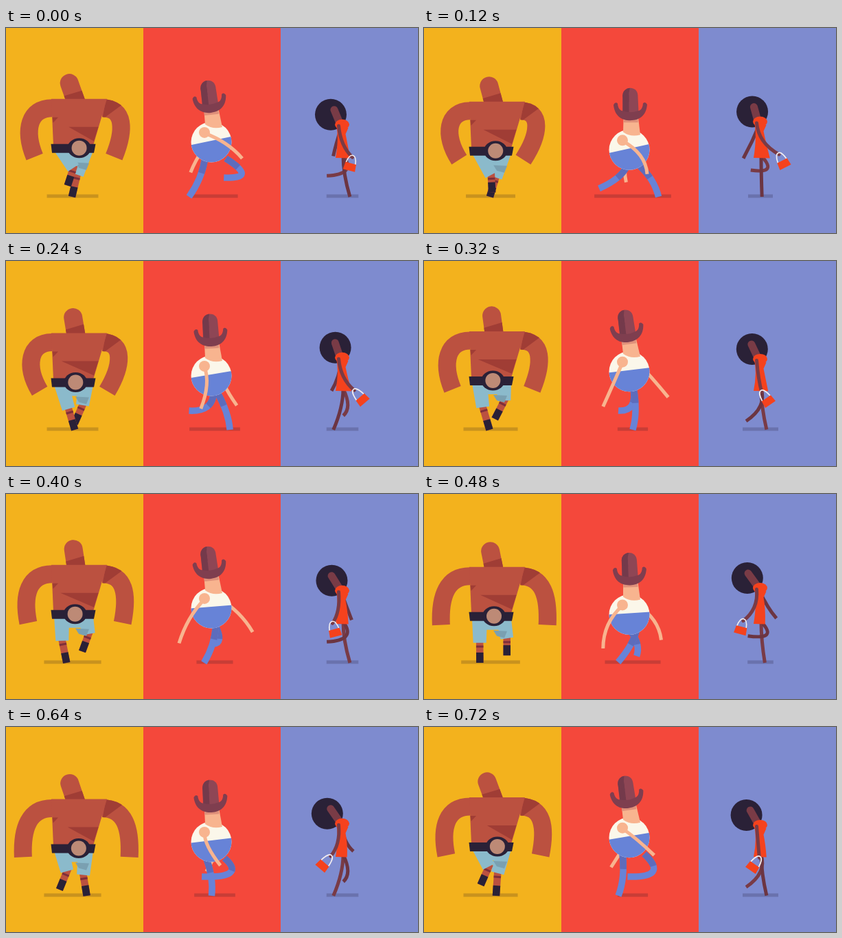
These frames come from a looping animation (600 px wide and 300 px high, 800 ms). An HTML page with a canvas:

```html
<!DOCTYPE html>
<html lang="en">
<head>
<meta charset="utf-8">
<title>Three walkers</title>
<style>
html, body { margin: 0; width: 100%; height: 100%; overflow: hidden; background: #f4483b; }
canvas { display: block; width: 600px; height: 300px; }
</style>
</head>
<body>
<canvas id="stage" width="600" height="300"></canvas>
<script>
const ctx = document.getElementById('stage').getContext('2d');
const LOOP = 800, STEP = 40, LAST = 18, FLOOR = 247;

const C = {
  skin: '#bb5140', skinDark: '#a03d35', navy: '#2a2137', buckle: '#bd8a76',
  shorts: '#8bbacb', shortsDark: '#7aa0b1', stripe: '#7e2f3a',
  peach: '#f8b48f', stubble: '#df907a', shirt: '#fbf7ea', jeans: '#6783d7', jeansDark: '#5d6cbc',
  hat: '#8e4655', hatDark: '#743a4b', brim: '#7f3e4f',
  brown: '#793b46', brownDark: '#6c3542', dress: '#f5421d', strap: '#f3eef0', shade: 'rgba(25,15,35,.2)'
};

// Cosine wave over the loop (u from 0 to 1) with its peak at `peak`; n waves per loop
const wave = (u, peak, n = 1) => Math.cos(2 * Math.PI * n * (u - peak));
const bob = (u, peak) => wave(u, peak, 2);
const clamp = (v, max) => Math.max(0, Math.min(max, v));

function trace(p) {
  ctx.beginPath();
  for (let i = 0; i < p.length; i += 2) ctx.lineTo(p[i], p[i + 1]);
  ctx.closePath();
}
function poly(color, ...p) {
  trace(p);
  ctx.fillStyle = color;
  ctx.fill();
}
function oval(color, x, y, rx, ry = rx) {
  ctx.beginPath();
  ctx.ellipse(x, y, rx, ry, 0, 0, 7);
  ctx.fillStyle = color;
  ctx.fill();
}
// Stroke through 2, 3 or 4 points: line, quadratic or cubic
function limb(color, width, p, cap = 'butt') {
  ctx.beginPath();
  ctx.moveTo(p[0], p[1]);
  const rest = p.slice(2);
  if (rest.length === 2) ctx.lineTo(...rest);
  else if (rest.length === 4) ctx.quadraticCurveTo(...rest);
  else ctx.bezierCurveTo(...rest);
  ctx.strokeStyle = color;
  ctx.lineWidth = width;
  ctx.lineCap = cap;
  ctx.stroke();
}
function clipped(p, draw) {
  ctx.save();
  trace(p);
  ctx.clip();
  draw();
  ctx.restore();
}
function placed(x, y, angle, draw) {
  ctx.save();
  ctx.translate(x, y);
  ctx.rotate(angle);
  draw();
  ctx.restore();
}
function ground(x, half) {
  ctx.fillStyle = C.shade;
  ctx.fillRect(x - half, 243.5, half * 2, 5);
}

function manLeg(hipX, hipY, kneeX, footX, lift) {
  const fy = FLOOR - lift, ky = hipY + 35 - lift * .6;
  const len = Math.hypot(footX - kneeX, fy - ky), ux = (footX - kneeX) / len, uy = (fy - ky) / len;
  const part = (color, a, b) =>
    limb(color, 10.5, [kneeX + ux * a, ky + uy * a, kneeX + ux * b, ky + uy * b]);
  part(C.skin, -4, len);
  part(C.stripe, 4, 7);
  part(C.navy, Math.max(9, len - 15), len);
  const d = Math.hypot(kneeX - hipX, ky - hipY);
  const nx = (ky - hipY) / d * 9.5, ny = (hipX - kneeX) / d * 9.5;
  poly(C.shorts, hipX - 11, hipY, hipX + 11, hipY, kneeX + nx, ky + ny, kneeX - nx, ky - ny);
}

function manArm(u, side, x, top, handX, reach) {
  const swing = wave(u, .2), lean = .29 + .3 * swing;
  const ex = handX - side * reach * swing, ey = top + 85;
  return [x, top + 13.5, x + side * 33, top + 13.5,
    ex + side * Math.sin(lean) * 43, ey - Math.cos(lean) * 43, ex, ey];
}

function drawMan(u) {
  const top = 105.3 + 2.6 * bob(u, .18), hipY = top + 76;
  const headX = 95.2 + 3.4 * wave(u, .42), discX = 103.6 + 3.3 * wave(u, .93);
  const lift = peak => 17 * Math.max(0, wave(u, peak));
  ground(97, 39.5 + 3.5 * wave(u, .65));

  manLeg(116, hipY, 112 + 9 * wave(u, .56), 107 + 14 * wave(u, .66) + 4 * bob(u, .71), lift(.46));
  poly(C.shortsDark, 101, top + 93, 121, top + 94, 117, top + 104, 106, top + 101);
  manLeg(81, hipY, 90 + 9 * wave(u, .07), 89 + 12 * wave(u, .24), lift(.96));
  poly(C.shorts, 70, hipY, 127, hipY, 110, hipY + 16, 88, hipY + 16);

  const head = [headX, top - 23, 102.5, top + 6];
  limb(C.skin, 27, head, 'round');
  clipped([80, top - 3, 130, top - 18, 130, top + 1, 80, top + 1], () => limb(C.skinDark, 27, head, 'round'));

  const right = manArm(u, 1, 140, top, 163.5, 20);
  limb(C.skin, 26, manArm(u, -1, 67, top, 37, 15));
  limb(C.skin, 26, right);
  clipped([147, top - 6, 186, top - 4, 140, top + 30], () => limb(C.skinDark, 26, right));

  poly(C.skin, 66, top, 147, top, 127, top + 68, 69, top + 68);
  poly(C.skinDark, 67.5, top + 27, 76, top + 27, 68.5, top + 35);
  poly(C.skinDark, discX * 2 - 122, top + 41, 134.5, top + 41, 128, top + 62);

  poly(C.navy, 65.5, top + 66, 130.5, top + 66, 128, top + 79, 67, top + 79);
  oval(C.navy, discX, top + 72, 17, 14.5);
  oval(C.buckle, discX, top + 72, 11);
}

function boyLeg(u, peak, hipX, hipY, footX, fold) {
  const lift = clamp(36 * (wave(u, peak) + .15), 28);
  const path = [hipX, hipY, (hipX + footX) / 2 + 7 + fold * lift / 28, 221, footX, FLOOR - lift];
  limb(C.jeans, 9.5, path);
  ctx.setLineDash([22, 999]);
  limb(C.jeansDark, 9.5, path);
  ctx.setLineDash([]);
}

function boyArm(u, side, x, y, handX, handY) {
  limb(C.peach, 5, [x, y, (x + handX) / 2 + side * 16 * wave(u, .18), (y + handY) / 2 - 6, handX, handY]);
}

function drawHat() {
  ctx.fillStyle = C.stubble;
  ctx.fillRect(-10, -4, 21, 11);
  const crown = (color, right) => {
    ctx.beginPath();
    ctx.moveTo(-11.5, -6);
    ctx.lineTo(-11, -33);
    ctx.bezierCurveTo(-10, -47, 10, -47, 11, -33);
    ctx.lineTo(12, -6);
    ctx.fillStyle = color;
    if (right) ctx.fill();
    else clipped([-12, -5, -12, -46, 0, -46, -2, -36, -2, -5], () => {
      ctx.fillStyle = color;
      ctx.fillRect(-11, -33, 11, 28);
      oval(color, 0, -33, 11, 10.5);
    });
  };
  crown(C.hat, true);
  crown(C.hatDark, false);
  ctx.beginPath();
  ctx.moveTo(-24.5, -19);
  ctx.bezierCurveTo(-23, -2, -12, 4, 0, 4);
  ctx.bezierCurveTo(12, 4, 23, -2, 24.5, -19);
  ctx.quadraticCurveTo(22, -24, 18.5, -21);
  ctx.bezierCurveTo(18, -12, 13, -10, 11, -10);
  ctx.quadraticCurveTo(0, -6, -11, -10);
  ctx.bezierCurveTo(-13, -10, -18, -12, -18.5, -21);
  ctx.quadraticCurveTo(-22, -24, -24.5, -19);
  ctx.fillStyle = C.brim;
  ctx.fill();
}

function drawBoy(u) {
  const x = 299, y = 170 + 8.3 * bob(u, .155), hatX = 299 + 1.7 * bob(u, .17), hatY = y - 47;
  const swing = wave(u, 0), spread = 8 + 8 * wave(u, .93);
  ground(304, 36 + 14 * bob(u, .16) + 6 * wave(u, .15));

  boyArm(u, -1, x + 11, y - 14, 314 - 46 * wave(u, .97), 212 + 5 * wave(u, .05) + 10 * bob(u, .17));
  boyLeg(u, .37, 305 - spread, y + 24, 283 + 28 * wave(u, .65), 10);
  boyLeg(u, .87, 305 + spread, y + 24, 306 + 30 * wave(u, .17) + 6 * bob(u, .17), 42);

  const tilt = 4.5 + 2.5 * wave(u, .1), waist = y - 2;
  oval(C.shirt, x, y, 29.5);
  clipped([x - 31, waist + tilt, x + 31, waist - tilt, x + 31, y + 40, x - 31, y + 40],
    () => oval(C.jeans, x, y, 29.5));
  ctx.beginPath();
  ctx.moveTo(hatX - 10, hatY - 3);
  ctx.lineTo(hatX + 11, hatY - 3);
  ctx.lineTo(x + 16, y - 22);
  ctx.quadraticCurveTo(x + 2, y - 18, x - 9, y - 26);
  ctx.fillStyle = C.peach;
  ctx.fill();

  oval(C.peach, x - 10, y - 14, 8);
  boyArm(u, 1, x - 10, y - 13, 298 + 46 * swing, 210 - 14 * wave(u, .97) + 10 * bob(u, .17));
  placed(hatX, hatY, .066 * (bob(u, .19) - 1), drawHat);
}

function girlLeg(u, color) {
  const lift = clamp(33 * (wave(u, .62) + .2), 40);
  limb(color, 5, [491, 187, 491 + lift * .65, 214, 484 + 17 * wave(u, .98), FLOOR - lift]);
}

// The bag hangs from the hand like a pendulum
function drawBag(u, handX, handY) {
  const dx = 12 * wave(u, .3), dy = 14, long = Math.hypot(dx, dy);
  placed(handX, handY, Math.atan2(-dx, dy), () => {
    limb(C.strap, 1.6, [-7, long - 5, -5, -7, 5, -7, 7, long - 5]);
    poly(C.dress, -8, long - 5.5, 8, long - 5.5, 9, long + 5.5, -9, long + 5.5);
  });
}

function drawGirl(u) {
  const hairX = 473.7 + 6 * wave(u, .27), hairY = 125.7 + 3.2 * bob(u, .4);
  const x = 489.5, y = hairY + 15.5, swing = wave(u, .16);
  ground(490, 22 + 4 * bob(u, .4));

  limb(C.brownDark, 5, [x - 1, y + 3, 489 - 11 * wave(u, .1), y + 28, 490 - 25 * swing, 186 + 5 * wave(u, .2)]);
  girlLeg((u + .5) % 1, C.brown);
  girlLeg(u, C.brownDark);

  oval(C.navy, hairX, hairY, 23);
  limb(C.brown, 11, [476 + 4.5 * wave(u, .18), hairY - 7, x - 4, y - 4], 'round');

  oval(C.dress, x, y - 1, 10.5, 7.5);
  ctx.beginPath();
  ctx.moveTo(x - 9, y - 2);
  ctx.quadraticCurveTo(x - 4, y + 18, 480, 190);
  ctx.lineTo(500 + 4 * wave(u, .2), 190.5);
  ctx.quadraticCurveTo(x + 8, y + 28, x + 5, y + 13);
  ctx.lineTo(x + 9, y + 4);
  ctx.fillStyle = C.dress;
  ctx.fill();

  const handX = 490 + 27 * swing, handY = y + 47;
  limb(C.brown, 5, [x - 5, y + 1, 487, y + 30, handX, handY], 'round');
  drawBag(u, handX, handY);
}

function draw(u) {
  ['#f3b21d', '#f4483b', '#7e8bcf'].forEach((color, i) => {
    ctx.fillStyle = color;
    ctx.fillRect(i * 200, 0, 200, 300);
  });
  drawMan(u);
  drawBoy(u);
  drawGirl(u);
}

const start = performance.now();
function tick() {
  const t = (performance.now() - start) % LOOP;
  draw(Math.min(Math.floor(t / STEP), LAST) * STEP / LOOP);
  requestAnimationFrame(tick);
}
tick();
</script>
</body>
</html>
```
